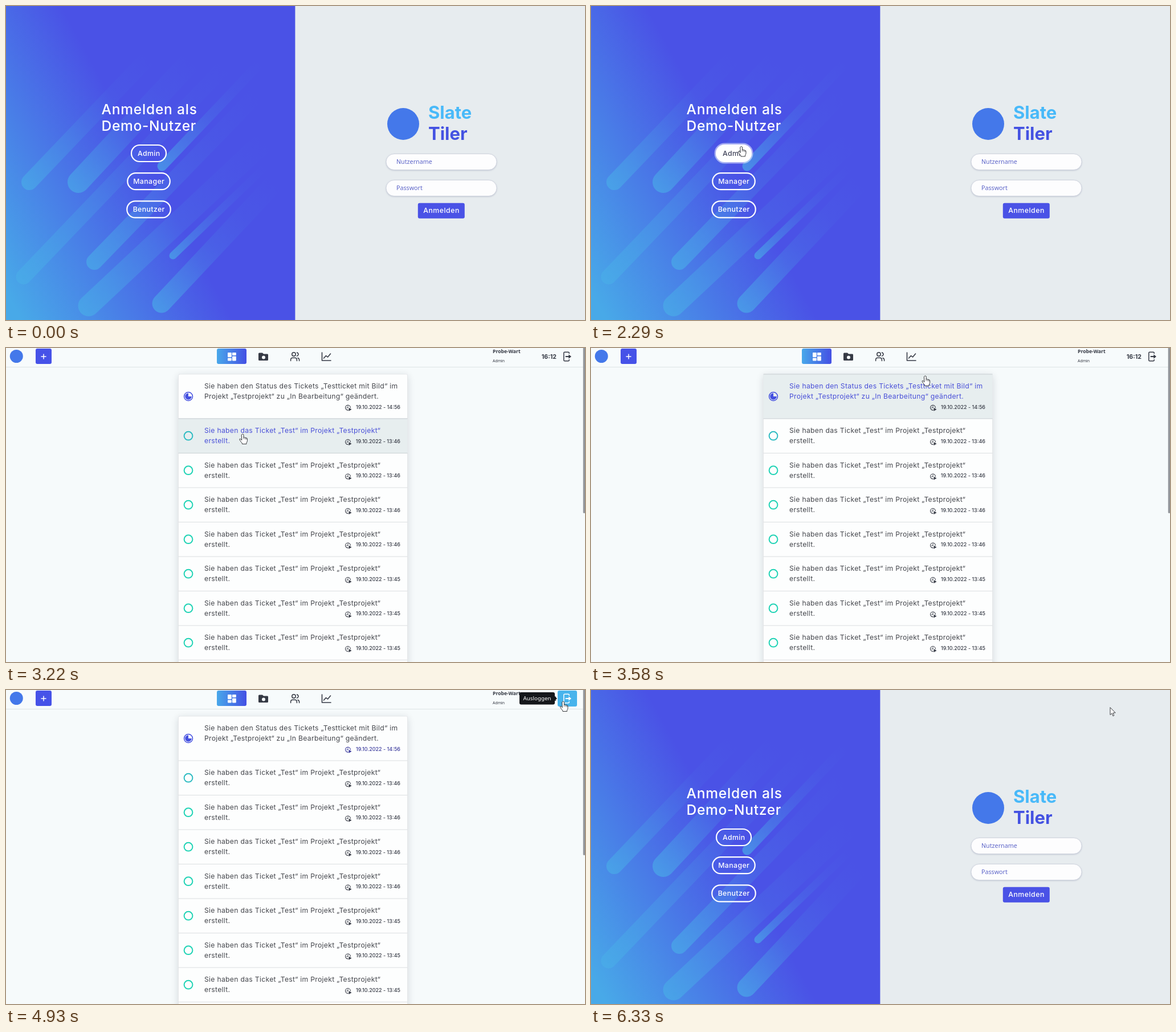
Animation of 1016 by 551 pixels, one loop 6390 ms. Source, as an HTML page with a canvas:

```html
<!DOCTYPE html>
<html lang="de">
<head>
<meta charset="utf-8">
<title>Anmeldung</title>
<style>
  html, body { margin: 0; width: 100%; height: 100%; overflow: hidden; background: #e7ecef; }
  canvas { display: block; width: 100vw; height: 100vh; }
</style>
</head>
<body>
<canvas id="stage"></canvas>
<script>
const W = 1016, H = 551, LOOP = 6390, STEP = 67.42;
const BLUE = '#4a52e6', INK = '#45474d', ICON = '#363a45', SKY = '#48b4ec';
const SANS = 'Inter, "Open Sans", sans-serif', NOTO = '"Noto Sans", "Open Sans", sans-serif';

const canvas = document.getElementById('stage');
const ratio = Math.max(1, window.devicePixelRatio || 1);
canvas.width = W * ratio;
canvas.height = H * ratio;
const c = canvas.getContext('2d');

const clamp = v => Math.max(0, Math.min(1, v));
const ramp = (t, a, b) => clamp((t - a) / (b - a));

// Cursor route: time, x, y
const route = [
  [330, 917, 538], [630, 664, 406], [930, 474, 307], [1270, 315, 258], [1610, 261, 242],
  [1750, 264, 246], [2823, 264, 246], [3200, 400, 160], [3510, 565, 58], [3580, 592, 46],
  [3880, 790, 34], [4180, 959, 29], [4250, 971, 28], [4510, 977, 20], [4930, 978, 19.5],
  [6065, 978, 19.5], [6130, 966, 22], [6330, 911, 31]
];

function cursorAt(t) {
  let i = 1;
  while (i < route.length - 1 && route[i][0] < t) i++;
  const [a, ax, ay] = route[i - 1], [b, bx, by] = route[i];
  const k = ramp(t, a, b);
  return { x: ax + (bx - ax) * k, y: ay + (by - ay) * k };
}

function text(str, x, y, font, color, align = 'left', spacing = 0) {
  c.font = font;
  c.fillStyle = color;
  c.textAlign = align;
  c.letterSpacing = spacing + 'px';
  c.fillText(str, x, y);
}

function box(x, y, w, h, r, fill, stroke, width = 1) {
  c.beginPath();
  c.roundRect(x, y, w, h, r);
  if (fill) { c.fillStyle = fill; c.fill(); }
  if (stroke) { c.strokeStyle = stroke; c.lineWidth = width; c.stroke(); }
}

function disc(x, y, r, fill) {
  c.beginPath();
  c.arc(x, y, r, 0, 7);
  c.fillStyle = fill;
  c.fill();
}

function ring(x, y, r, color, width) {
  c.beginPath();
  c.arc(x, y, r, 0, 7);
  c.strokeStyle = color;
  c.lineWidth = width;
  c.stroke();
}

function line(d, color, width) {
  c.strokeStyle = color;
  c.lineWidth = width;
  c.lineCap = c.lineJoin = 'round';
  c.stroke(new Path2D(d));
}

function shadow(color, blur, dy) {
  c.shadowColor = color;
  c.shadowBlur = blur * ratio;
  c.shadowOffsetY = dy * ratio;
}

function linear(x0, y0, x1, y1, ...colors) {
  const g = c.createLinearGradient(x0, y0, x1, y1);
  colors.forEach((color, i) => g.addColorStop(i / (colors.length - 1), color));
  return g;
}

// Light streaks: head x, y, tail x, y, radius
const streaks = [
  [41, 309, 250, 90, 14], [127, 309, 325, 96, 19], [274, 281, 446, 100, 8.5],
  [31, 475, 385, 105, 13.5], [155, 449, 440, 155, 14], [145, 526, 455, 236, 18.5],
  [293, 438, 455, 282, 6.5], [273, 522, 472, 310, 16.5]
];

function backdrop() {
  c.fillStyle = linear(-211, 115, 75, -41, '#48a9e8', BLUE);
  c.fillRect(0, 0, 507.4, H);
  c.lineCap = 'round';
  for (const [x0, y0, x1, y1, r] of streaks) {
    c.strokeStyle = linear(x0 - r, y0 + r, x1, y1,
      'rgba(73,174,232,.68)', 'rgba(73,166,232,.4)', 'rgba(73,158,232,.18)', 'rgba(73,150,232,.06)', 'rgba(73,150,232,0)');
    c.lineWidth = 2 * r;
    c.beginPath();
    c.moveTo(x0, y0);
    c.lineTo(x1, y1);
    c.stroke();
  }
}

function pill(label, w, y, hover, halo) {
  const x = 250.5 - w / 2, h = 29;
  if (halo) box(x - 2, y - 2, w + 4, h + 4, 16.5, null, `rgba(255,255,255,${0.5 * halo})`, 3);
  box(x, y, w, h, 14.5, `rgba(255,255,255,${hover})`, '#fff', 2.2);
  text(label, 250.7, y + 18.7, `500 12.3px ${SANS}`, hover > 0.5 ? '#41445a' : '#fff', 'center', 0.4);
}

function field(label, y) {
  shadow('rgba(60,70,110,.28)', 3, 1);
  box(667, y, 194, 28, 14, '#fdfdfe');
  shadow('transparent', 0, 0);
  box(667, y, 194, 28, 14, null, '#cdd2dd', 0.9);
  text(label, 685, y + 17.8, `10.7px ${NOTO}`, '#5c64c8');
}

function login(t) {
  c.fillStyle = '#e7ecef';
  c.fillRect(0, 0, W, H);
  backdrop();
  const big = `500 24.5px ${SANS}`;
  text('Anmelden als', 167.5, 190, big, '#fff', 'left', 0.8);
  text('Demo-Nutzer', 167.5, 219.3, big, '#fff', 'left', 0.7);
  const active = t < 3000;
  pill('Admin', 61, 244, active ? ramp(t, 1650, 1880) : 0, active ? ramp(t, 1930, 2150) : 0);
  pill('Manager', 74.5, 293.2, 0, 0);
  pill('Benutzer', 76.5, 342.4, 0, 0);

  disc(697, 207, 28, '#4478ea');
  const brand = `700 31px ${SANS}`;
  text('Slate', 741, 198, brand, '#48b9f9');
  text('Tiler', 741, 235, brand, '#4452e2');
  field('Nutzername', 259.5);
  field('Passwort', 305.5);
  box(722.8, 345.8, 82, 27, 3, BLUE);
  text('Anmelden', 764, 363.2, `500 12.3px ${SANS}`, '#fff', 'center', 0.5);
}

const rowTop = i => i ? 124 + (i - 1) * 60.5 : 46;
const rowEnd = i => rowTop(i + 1);
const inRow = (p, i) => p.x > 302 && p.x < 705 && p.y >= rowTop(i) && p.y < rowEnd(i);

// Hover fade: share of the last moments spent over the row
function hoverOf(i, t) {
  let n = 0;
  for (let k = 0; k < 5; k++) if (inRow(cursorAt(t - k * 28), i)) n++;
  return n / 5;
}

function row(i, t) {
  const y = rowTop(i), h = rowEnd(i) - y, on = hoverOf(i, t), first = i === 0;
  c.fillStyle = `rgba(231,238,239,${on})`;
  c.fillRect(302.5, y, 402, h);
  c.fillStyle = on > 0.5 ? '#c9d0d3' : '#dcdfe1';
  c.fillRect(302.5, y + h - 0.5, 402, 1);
  if (on > 0.5) c.fillRect(302.5, y - 0.5, 402, 1);

  const mid = first ? 85 : y + 30.2;
  if (first) {
    ring(320, mid, 7.5, '#4450e0', 1.5);
    c.beginPath();
    c.moveTo(320, mid);
    c.arc(320, mid, 5.8, 0, Math.PI * 1.5);
    c.fillStyle = '#4450e0';
    c.fill();
  } else ring(320, mid, 7.4, i === 1 ? '#2fbcc2' : '#20d3b5', 2);

  const lines = first
    ? ['Sie haben den Status des Tickets „Testticket mit Bild“ im', 'Projekt „Testprojekt“ zu „In Bearbeitung“ geändert.']
    : ['Sie haben das Ticket „Test“ im Projekt „Testprojekt“', 'erstellt.'];
  lines.forEach((s, k) =>
    text(s, 348, y + 25.2 + 18 * k, `12.2px ${SANS}`, on > 0.4 ? '#4a50d8' : INK, 'left', 0.29));

  const dy = first ? 103.5 : y + 39.7;
  const tone = first && t > 3620 ? '#3d3d9e' : ICON;
  const clock = first ? '14:56' : i < 5 ? '13:46' : '13:45';
  text('19.10.2022 - ' + clock, 692, dy + 3.2, `500 9px ${SANS}`, tone, 'right');
  c.beginPath();
  c.arc(600, dy + 1.2, 4.4, 0.9 * Math.PI / 2, 2 * Math.PI);
  c.strokeStyle = tone;
  c.lineWidth = 1.1;
  c.stroke();
  line(`M600 ${dy - 1.4}V${dy + 1.4}H597.8`, tone, 1);
  c.fillStyle = tone;
  c.fill(new Path2D(`M601.5 ${dy + 1.2}L606.5 ${dy + 4.2}L601.5 ${dy + 7.2}Z`));
}

function header(t) {
  c.fillStyle = '#f7fbfc';
  c.fillRect(0, 0, W, 33);
  c.fillStyle = '#dfe4e6';
  c.fillRect(0, 33, W, 1);
  disc(18.3, 14.5, 11.5, '#4478ea');
  box(52, 1, 28, 27, 3, '#4652e8');
  line('M62 15H70M66 11V19', '#fff', 1.5);

  box(370, 1, 52, 27, 3, linear(370, 0, 422, 0, '#48a8ea', '#4450e4'));
  for (const [x, y, h] of [[389, 8, 8], [389, 17.4, 5], [397, 8, 5], [397, 14.4, 8]]) box(x, y, 6.8, h, 0.8, '#fff');

  c.fillStyle = ICON;
  c.fill(new Path2D('M444.5 8.5H450L452 10.5H458.8Q460 10.5 460 12V20.5Q460 22 458.5 22H444.5Q443 22 443 20.5V10Q443 8.5 444.5 8.5Z'));
  disc(452, 16.5, 3, '#f7fbfc');
  ring(505, 11, 3.2, ICON, 1.5);
  line('M499.6 22.5V21Q499.6 17.3 503 17.3H507Q510.4 17.3 510.4 21V22.5M510.5 8Q513 8.8 513 11T510.5 14M512 17.5Q514.6 18.2 514.6 21V22.5', ICON, 1.5);
  line('M554.5 8V22H570M557.5 18L561.5 13.5L564.5 16L569.5 10', ICON, 1.6);

  text('Probe-Wart', 854, 8.6, `600 8.6px ${NOTO}`, ICON);
  text('Admin', 854, 24.5, `6.9px ${NOTO}`, ICON);
  text('16:12', 966, 19.2, `700 10.6px ${SANS}`, ICON, 'right');

  const on = ramp(t, 4190, 4460), press = ramp(t, 5380, 5540);
  if (press) box(966.5, -0.5, 37, 31, 4, null, `rgba(72,180,236,${0.25 * press})`, 3);
  if (on) {
    c.globalAlpha = on;
    box(968, 1, 34, 28, 3, SKY);
    c.globalAlpha = 1;
  }
  const tone = on > 0.5 ? '#fff' : ICON;
  line('M988.2 9.5V8.8Q988.2 7.3 986.7 7.3H980.3Q978.8 7.3 978.8 8.8V21.2Q978.8 22.7 980.3 22.7H986.7Q988.2 22.7 988.2 21.2V20.5', tone, 1.5);
  line('M982.5 15H988', tone, 2);
  c.fillStyle = tone;
  c.fill(new Path2D('M987.3 11.3L992 15L987.3 18.7Z'));

  const tip = ramp(t, 4660, 4900);
  if (tip) {
    c.globalAlpha = tip;
    box(901, 4, 62, 21.5, 3, '#15171b');
    c.fill(new Path2D('M962.5 11L967 15L962.5 19Z'));
    text('Ausloggen', 932, 18.3, `500 9.8px ${NOTO}`, '#fff', 'center');
    c.globalAlpha = 1;
  }
}

function dashboard(t) {
  c.fillStyle = '#f6fafb';
  c.fillRect(0, 0, W, H);
  shadow('rgba(20,30,50,.16)', 14, 3);
  box(302.5, 46, 402, 560, [2, 2, 0, 0], '#fdfefe');
  shadow('transparent', 0, 0);
  box(302.5, 46, 402, 560, [2, 2, 0, 0], null, '#e2e5e8', 0.8);
  for (let i = 0; i < 9; i++) row(i, t);
  header(t);
  box(1012.7, -4, 3.6, 294, 1.8, '#93969b');
}

const HAND = new Path2D('M-2 1.5Q-.2 -.8 1.5 1.5V6.5Q3 5.4 4.1 7Q5.6 6 6.3 7.7Q8 7.2 8 9.2V12Q7.8 14.5 6.5 16V18H-1L-1.2 16.5Q-3 14.5 -5.5 10.6Q-6 8.6 -4 9.1L-2 11Z');
const ARROW = new Path2D('M0 0V12.6L2.9 9.9L4.9 14.6L6.9 13.8L4.9 9.2L8.8 9Z');

function pointer(t) {
  const p = cursorAt(t);
  const hand = (t > 1640 && t < 2840)
    || (t > 2840 && t < 4150 && p.x > 302 && p.x < 705 && p.y >= 46)
    || (t > 4200 && t < 6100);
  c.save();
  c.translate(p.x, p.y);
  c.lineWidth = 0.9;
  c.lineJoin = 'round';
  c.strokeStyle = '#24262b';
  c.fillStyle = '#fff';
  const shape = hand ? HAND : ARROW;
  c.fill(shape);
  c.stroke(shape);
  if (hand) line('M1.5 6.5V9M4.1 7V9.5M6.3 7.7V10', '#24262b', 0.7);
  c.restore();
}

function draw(t) {
  // The picture advances in even steps
  const q = t < 330 ? t : 330 + Math.floor((t - 330) / STEP + 0.12) * STEP;
  c.setTransform(ratio, 0, 0, ratio, 0, 0);
  if (t >= 2420 && t < 5800) dashboard(q);
  else login(q);
  if (t >= 330) pointer(q);
}

const start = performance.now();
function tick() {
  draw((performance.now() - start) % LOOP);
  requestAnimationFrame(tick);
}
tick();
</script>
</body>
</html>
```
